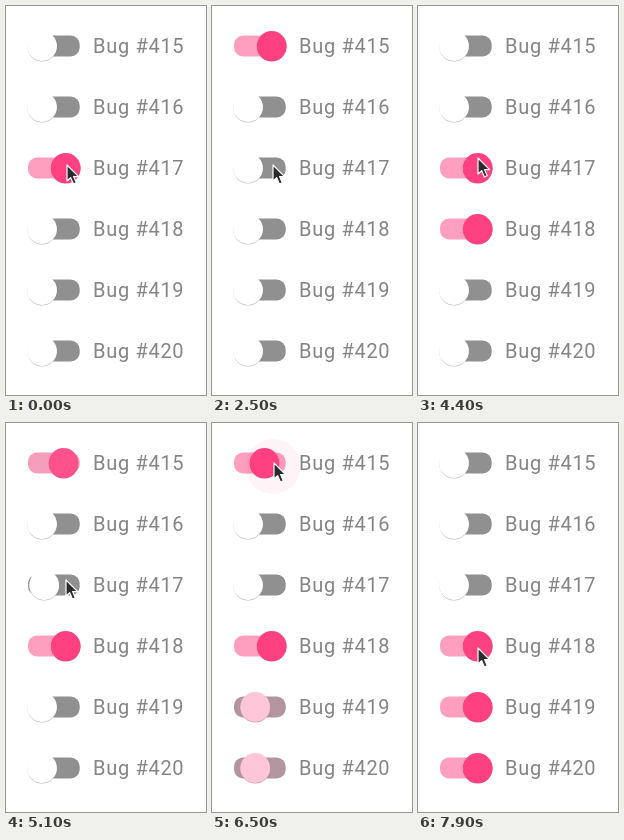
Animation, 200 px wide and 389 px high, one loop 8 s. Source, as an HTML page:

```html
<!DOCTYPE html>
<html lang="en">
<head>
<meta charset="utf-8">
<title>Bug switches</title>
<style>
  html, body { margin: 0; width: 100%; height: 100%; overflow: hidden; background: #fff; }
  svg { display: block; width: 100%; height: 100%; }
  text { font: 20px Roboto, sans-serif; letter-spacing: .7px; fill: #858585; }
</style>
</head>
<body>
<svg id="stage" viewBox="0 0 200 389">
  <defs>
    <filter id="soft" x="-20%" y="-20%" width="140%" height="140%">
      <feGaussianBlur stdDeviation=".4"/>
    </filter>
  </defs>
</svg>
<script>
const LOOP = 8000, SLIDE = 250, FADE = 120;
const OFF_X = 36, ON_X = 59.7;
const GREY = [144, 144, 144], WHITE = [255, 255, 255];
const PALE = [255, 159, 191], PINK = [255, 64, 129];
const LIGHT_RIM = [190, 190, 190], PINK_RIM = [226, 75, 128];

// Switches on at the start, by row index
const START_ON = [2];

// Row pressed, press and release times, rows turned on and off
const clicks = [
  { row: 2, down: 710, up: 850, on: [0], off: [2] },
  { row: 0, down: 3270, up: 3530, on: [2, 3], off: [0] },
  { row: 2, down: 4720, up: 4900, on: [0], off: [2] },
  { row: 0, down: 6230, up: 6408, on: [4, 5], off: [0] }
];

// Pointer stops: time, x, y
const path = [
  [0, 61, 159], [2550, 61, 159], [3100, 61, 43], [3650, 61, 43],
  [4080, 126, 268], [4180, 130, 266], [4390, 60, 152],
  [4600, 60, 157], [5300, 60, 157], [5850, 62, 40],
  [6950, 62, 40], [7600, 60, 225], [LOOP, 60, 225]
];

const stage = document.getElementById('stage');
const clamp = v => Math.max(0, Math.min(1, v));
const lerp = (a, b, p) => a + (b - a) * p;
const ease = p => (1 - Math.cos(Math.PI * clamp(p))) / 2;
const mix = (a, b, p) => `rgb(${a.map((v, i) => Math.round(lerp(v, b[i], p)))})`;

function add(tag, attrs, parent = stage) {
  const el = document.createElementNS('http://www.w3.org/2000/svg', tag);
  for (const key in attrs) el.setAttribute(key, attrs[key]);
  return parent.appendChild(el);
}

const rows = Array.from({ length: 6 }, (_, i) => {
  const y = 40 + 61 * i;
  const g = add('g', { transform: `translate(0 ${y})` });
  const row = {
    track: add('rect', { x: 22, y: -10.5, width: 51.7, height: 21, rx: 9 }, g),
    ripple: add('circle', { cx: 61, cy: 3.5, fill: '#e91e63' }, g),
    shadow: add('circle', { cy: 0.8, r: 14.7, filter: 'url(#soft)' }, g),
    thumb: add('circle', { r: 14.9 }, g)
  };
  add('text', { x: 87, y: 7.2 }, g).textContent = 'Bug #' + (415 + i);
  return row;
});

const pointer = add('path', {
  d: 'M0 0V16L3.7 12.7L6.4 19L9.3 17.7L6.6 11.6H11.6Z',
  fill: '#2b2b2b', stroke: '#fff', 'stroke-width': 1.2, 'stroke-linejoin': 'round'
});

// Slide position and colour share of a switch, both 0 to 1
function switchState(i, t) {
  let pos = START_ON.includes(i) ? 1 : 0, tint = pos;
  for (const c of clicks) {
    if (t < c.up) break;
    const p = clamp((t - c.up) / SLIDE);
    if (c.on.includes(i)) pos = tint = ease(p);
    if (c.off.includes(i)) {
      pos = 1 - ease(p);
      tint = 1 - ease((p - 0.38) / 0.42);
    }
  }
  return { pos, tint };
}

function rippleState(i, t) {
  const c = clicks.find(k => k.row === i && t >= k.down && t < k.up + FADE);
  if (!c) return { r: 0, alpha: 0 };
  return {
    r: lerp(12, 27.5, ease((t - c.down) / 210)),
    alpha: 0.22 * (1 - clamp((t - c.up) / FADE))
  };
}

function pointerAt(t) {
  const k = Math.max(1, path.findIndex(s => s[0] > t));
  const [t0, x0, y0] = path[k - 1], [t1, x1, y1] = path[k];
  const p = ease((t - t0) / (t1 - t0));
  return [lerp(x0, x1, p), lerp(y0, y1, p)];
}

function draw(t) {
  rows.forEach((row, i) => {
    const { pos, tint } = switchState(i, t);
    const { r, alpha } = rippleState(i, t);
    const x = lerp(OFF_X, ON_X, pos);
    row.track.setAttribute('fill', mix(GREY, PALE, tint));
    row.thumb.setAttribute('fill', mix(WHITE, PINK, tint));
    row.shadow.setAttribute('fill', mix(LIGHT_RIM, PINK_RIM, tint));
    row.thumb.setAttribute('cx', x);
    row.shadow.setAttribute('cx', x);
    row.ripple.setAttribute('r', r);
    row.ripple.setAttribute('opacity', alpha);
  });
  pointer.setAttribute('transform', `translate(${pointerAt(t)})`);
}

const begin = performance.now();
function tick() {
  draw((performance.now() - begin) % LOOP);
  requestAnimationFrame(tick);
}
tick();
</script>
</body>
</html>
```
